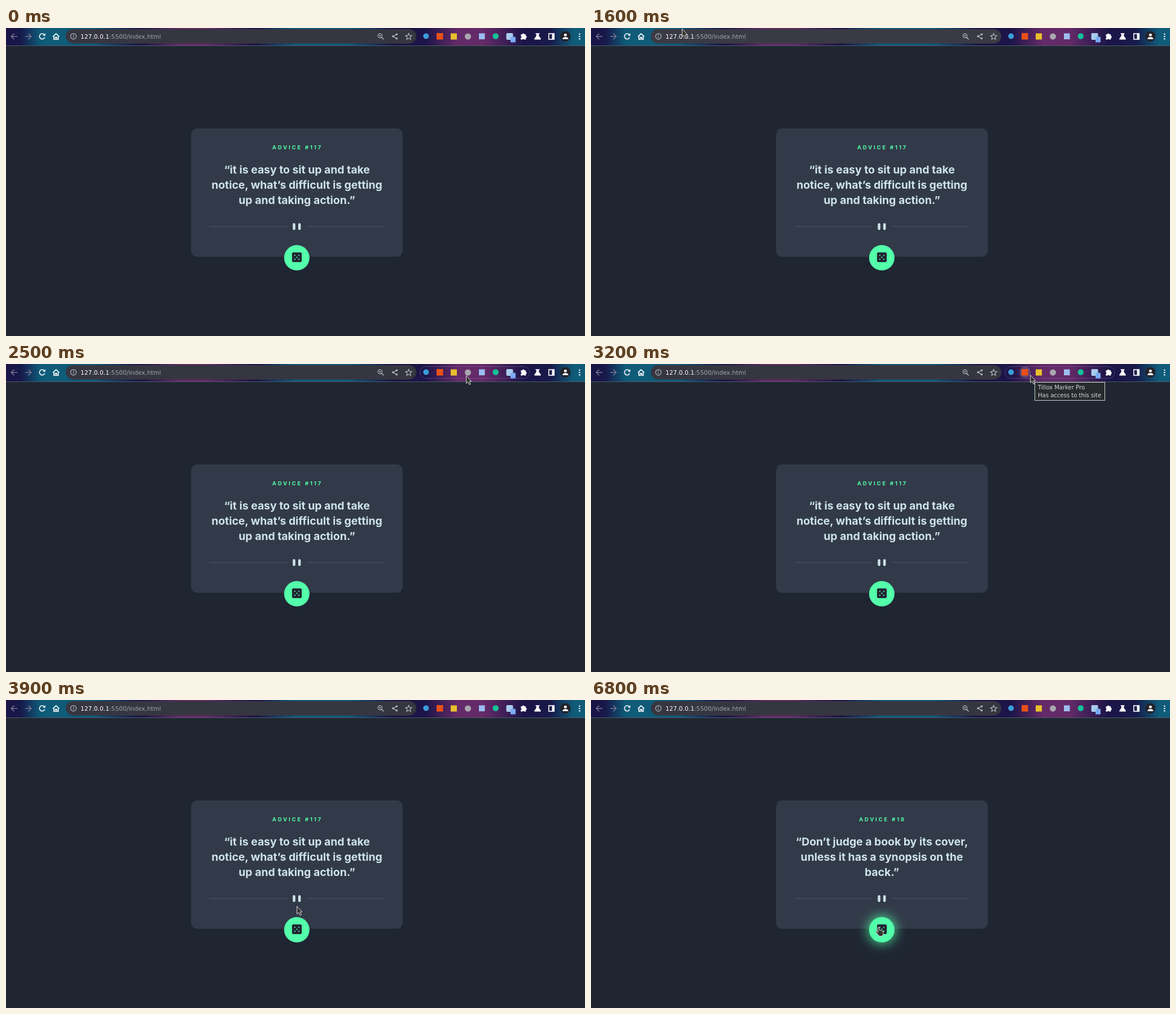
Animation, 1026 px wide and 546 px high, one loop 8 s. Source, as an HTML page:

```html
<!DOCTYPE html>
<html lang="en">
<head>
<meta charset="utf-8">
<title>Advice card</title>
<style>
  html, body { margin: 0; width: 100%; height: 100%; overflow: hidden; background: #1f2632; }
  svg { display: block; width: 1026px; height: 546px; }

  .url, .tip { font-family: "DejaVu Sans", sans-serif; }
  .url { font-size: 10.7px; fill: #a3a4ad; }
  .tip { font-size: 10.05px; fill: #d6d6d6; }
  .label { font: 700 9.6px Inter, sans-serif; letter-spacing: 2.75px; fill: #53ffaa; text-anchor: middle; }
  .quote { font: 700 19.35px Inter, sans-serif; fill: #cee3e9; text-anchor: middle; }
  .line { fill: none; stroke: #fff; stroke-width: 1.6; }
  .dim { stroke: #77748f; }
  .soft { stroke: #b4b5bd; stroke-width: 1.2; }
  .halo { fill: #fff; fill-opacity: .17; }
  .pointer { fill: #34332f; stroke: #dedede; stroke-width: 1; stroke-linejoin: round; }

  .arrow, .hand, .timed, .first, .bar { animation: 8s step-end infinite; }
  .arrow, .hand { transform: translate(-60px, -60px); }
  .timed { opacity: 0; }
  .arrow { animation-name: arrow; }
  .hand { animation-name: hand; }
  .bar { fill: #363640; animation-name: bar; }
  .star { animation-name: star; }
  .pill { animation-name: pill; }
  .ext { animation-name: ext; }
  .tooltip { animation-name: tooltip; }
  .glow { fill: #53ffaa; filter: blur(11px); animation-name: glow; }
  .first { animation-name: first; }
  .second { animation-name: second; }

  @keyframes arrow {
    13.75% { transform: translate(70px, 1px); }
    15%    { transform: translate(73px, 10px); }
    16.25% { transform: translate(82px, 19px); }
    17.5%  { transform: translate(104px, 14px); }
    18.75% { transform: translate(133px, 7px); }
    20%    { transform: translate(161px, 1px); }
    21.25% { transform: translate(205px, 2px); }
    22.5%  { transform: translate(275px, 5px); }
    23.75% { transform: translate(385px, 8px); }
    25%    { transform: translate(560px, 11px); }
    26.25% { transform: translate(715px, 11px); }
    27.5%  { transform: translate(748px, 20px); }
    28.75% { transform: translate(778px, 27px); }
    30%    { transform: translate(802px, 24px); }
    31.25% { transform: translate(815px, 20px); }
    36.25% { transform: translate(778px, 19px); }
    41.25% { transform: translate(723px, 111px); }
    43.75% { transform: translate(633px, 226px); }
    46.25% { transform: translate(547px, 330px); }
    48.75% { transform: translate(515px, 365px); }
    51.25% { transform: translate(-60px, -60px); }
  }
  @keyframes hand {
    51.25% { transform: translate(503px, 394px); }
    52.5%  { transform: translate(498px, 399px); }
    55%    { transform: translate(504px, 402px); }
  }
  @keyframes bar { 17.5% { fill: #3a3a44; } 27.5% { fill: #363640; } }
  @keyframes star { 26.25% { opacity: 1; } 27.5% { opacity: 0; } }
  @keyframes pill { 28.75% { opacity: 1; } 41.25% { opacity: 0; } }
  @keyframes ext { 36.25% { opacity: 1; } 41.25% { opacity: .5; } 43.75% { opacity: 0; } }
  @keyframes tooltip { 40% { opacity: 1; } 41.25% { opacity: 0; } }
  @keyframes glow { 51.25% { opacity: .5; } 52.5% { opacity: 1; } }
  @keyframes first { 85% { opacity: 0; } }
  @keyframes second { 85% { opacity: 1; } }
</style>
</head>
<body>
<svg viewBox="0 0 1026 546">
  <defs>
    <linearGradient id="theme">
      <stop offset="0" stop-color="#1b1446"/>
      <stop offset=".025" stop-color="#17194a"/>
      <stop offset=".06" stop-color="#0f5b79"/>
      <stop offset=".15" stop-color="#0f5b79"/>
      <stop offset=".23" stop-color="#1a1446"/>
      <stop offset=".3" stop-color="#652a68"/>
      <stop offset=".35" stop-color="#652a68"/>
      <stop offset=".43" stop-color="#1a1446"/>
      <stop offset=".5" stop-color="#0f5b79"/>
      <stop offset=".59" stop-color="#0f5b79"/>
      <stop offset=".67" stop-color="#1a1446"/>
      <stop offset=".725" stop-color="#1d1548"/>
      <stop offset=".78" stop-color="#652a68"/>
      <stop offset=".825" stop-color="#652a68"/>
      <stop offset=".895" stop-color="#1c1447"/>
      <stop offset=".94" stop-color="#181a4a"/>
      <stop offset=".98" stop-color="#0f5b79"/>
      <stop offset="1" stop-color="#0f5b79"/>
    </linearGradient>
  </defs>

  <!-- Toolbar -->
  <rect width="1026" height="31" fill="url(#theme)"/>
  <rect y="31" width="1026" height="1" fill="#4c5866"/>
  <g class="line">
    <path class="dim" d="M20 15H9.500M14.500 9.700L9.200 15l5.300 5.300M34 15h10.500M39.500 9.700L44.800 15l-5.300 5.300"/>
    <path d="M67.800 11.800A4.800 4.800 0 1 0 68.600 16.500"/>
    <path d="M83.200 15.200L88.700 10l5.500 5.200M84.800 14v6.200h2.700v-3.700h2.400v3.700h2.700V14"/>
  </g>
  <path d="M69.600 9.300v4.500h-4.500z" fill="#fff"/>

  <rect class="bar" x="106" y="2" width="621" height="25.600" rx="12.800"/>
  <g class="line soft">
    <circle cx="119.500" cy="14.800" r="5"/>
    <path d="M119.500 14.200v3.400M119.500 11.700v1.300"/>
    <circle cx="662.700" cy="13.700" r="3.600"/>
    <path d="M665.400 16.400l3.800 3.800M661 13.700h3.400" stroke-width="1.500"/>
    <path d="M692.300 11.300L686 14.800l6.300 3.600"/>
  </g>
  <g fill="#b4b5bd">
    <circle cx="692.300" cy="11.200" r="1.800"/>
    <circle cx="685.800" cy="14.800" r="1.800"/>
    <circle cx="692.300" cy="18.500" r="1.800"/>
  </g>
  <circle class="halo timed star" cx="714" cy="14.800" r="11.500"/>
  <path class="line soft" d="M713.500 9.500l1.600 3.700 4 .4-3 2.700.9 3.900-3.500-2.100-3.500 2.100.9-3.900-3-2.700 4-.4z"/>
  <text class="url" x="132" y="18.600"><tspan fill="#fff">127.0.0.1</tspan>:5500/index.html</text>

  <!-- Extensions -->
  <rect class="timed pill" x="733.500" y="4.500" width="194.500" height="21" rx="10.500" fill="none" stroke="#8678b4" stroke-opacity=".4"/>
  <circle class="halo timed ext" cx="769" cy="14.500" r="10.200"/>
  <circle cx="744.300" cy="14.500" r="5" fill="#3d9ddb"/>
  <rect x="763" y="9" width="11.500" height="11.500" fill="#e8501a"/>
  <rect x="788" y="9.500" width="11" height="11" fill="#e9c02c"/>
  <circle cx="818.500" cy="15" r="5.500" fill="#a9a7ad"/>
  <rect x="838" y="9.500" width="10.500" height="10.500" fill="#9dbdf0"/>
  <circle cx="867.700" cy="14.500" r="5.300" fill="#12c09a"/>
  <rect x="886.500" y="9" width="12" height="12" rx="2" fill="#a9cbea"/>
  <rect x="894" y="15.500" width="9" height="10" rx="1.500" fill="#79abf5"/>

  <g fill="#fff">
    <path d="M912.500 11.300h2.600a1.700 1.700 0 1 1 3.400 0h2.700v2.900a1.700 1.700 0 1 1 0 3.400v3h-3a1.700 1.700 0 0 0-3.200 0h-2.800v-3a1.700 1.700 0 0 0 0-3.300z"/>
    <path d="M938.500 9.300h7v1.400h-1.200v3.200l3.500 5.200q.5 1.400-1 1.500h-9.600q-1.500-.1-1-1.500l3.500-5.200v-3.200h-1.200z"/>
    <circle cx="1016.300" cy="10.700" r="1.300"/>
    <circle cx="1016.300" cy="15" r="1.300"/>
    <circle cx="1016.300" cy="19.300" r="1.300"/>
    <path d="M967.500 10h4v10h-4z"/>
  </g>
  <rect class="line" x="961.800" y="10" width="9.500" height="10"/>
  <circle cx="991.300" cy="14.800" r="9.200" fill="#22222a"/>
  <circle cx="991.300" cy="12.300" r="2.500" fill="#fff"/>
  <path d="M986.300 19.800v-1q.5-2.500 5-2.700 4.500.2 5 2.700v1z" fill="#fff"/>

  <!-- Advice card -->
  <rect x="328" y="178" width="375" height="227.500" rx="10.500" fill="#323a49"/>
  <g class="first">
    <text class="label" x="516.400" y="214.700">ADVICE #117</text>
    <text class="quote"><tspan x="515.500" y="258">“it is easy to sit up and take</tspan><tspan x="515.500" y="285">notice, what’s difficult is getting</tspan><tspan x="515.500" y="312">up and taking action.”</tspan></text>
  </g>
  <g class="timed second">
    <text class="label" x="516.400" y="214.700">ADVICE #18</text>
    <text class="quote"><tspan x="515.500" y="258">“Don’t judge a book by its cover,</tspan><tspan x="515.500" y="285">unless it has a synopsis on the</tspan><tspan x="515.500" y="312">back.”</tspan></text>
  </g>
  <path d="M361 352h136.500M533 352h136.500" stroke="#4a566b"/>
  <g fill="#cee3e9">
    <rect x="508.200" y="346" width="4.500" height="12" rx="2"/>
    <rect x="517.800" y="346" width="4.500" height="12" rx="2"/>
  </g>

  <!-- Dice button -->
  <circle class="timed glow" cx="515.300" cy="407.300" r="22.500"/>
  <circle cx="515.300" cy="407.300" r="22.500" fill="#53ffaa"/>
  <rect x="506.800" y="397.800" width="17.200" height="17.200" rx="2.300" fill="#202733"/>
  <g fill="#53ffaa">
    <circle cx="511.800" cy="403" r="1.100"/>
    <circle cx="518.900" cy="403" r="1.100"/>
    <circle cx="515.400" cy="406.400" r="1.100"/>
    <circle cx="511.800" cy="409.900" r="1.100"/>
    <circle cx="518.900" cy="409.900" r="1.100"/>
  </g>

  <g class="timed tooltip">
    <rect x="786.500" y="32.500" width="124" height="32" fill="#282b2d" stroke="#d0d0d0"/>
    <text class="tip" x="792" y="45">Tillox Marker Pro</text>
    <text class="tip" x="792" y="58.500">Has access to this site</text>
  </g>

  <g class="arrow"><path class="pointer" d="M.6 .6v13.800l3.100-2.700 2.300 4.900 2.400-1.100-2.200-4.600 3.500-.4z"/></g>
  <g class="hand"><path class="pointer" d="M4.300 9.800V2q0-1.500 1.400-1.500T7.100 2v4.200q1.500-.8 2.300.5 1.500-.7 2.200.6 2.300-.5 2.300 1.700v3q0 1.700-1.200 3v1.800H5.900v-1.600L1 10q-.8-1.300.4-1.900 1.100-.4 2.900 1.700z"/></g>
</svg>
</body>
</html>
```
